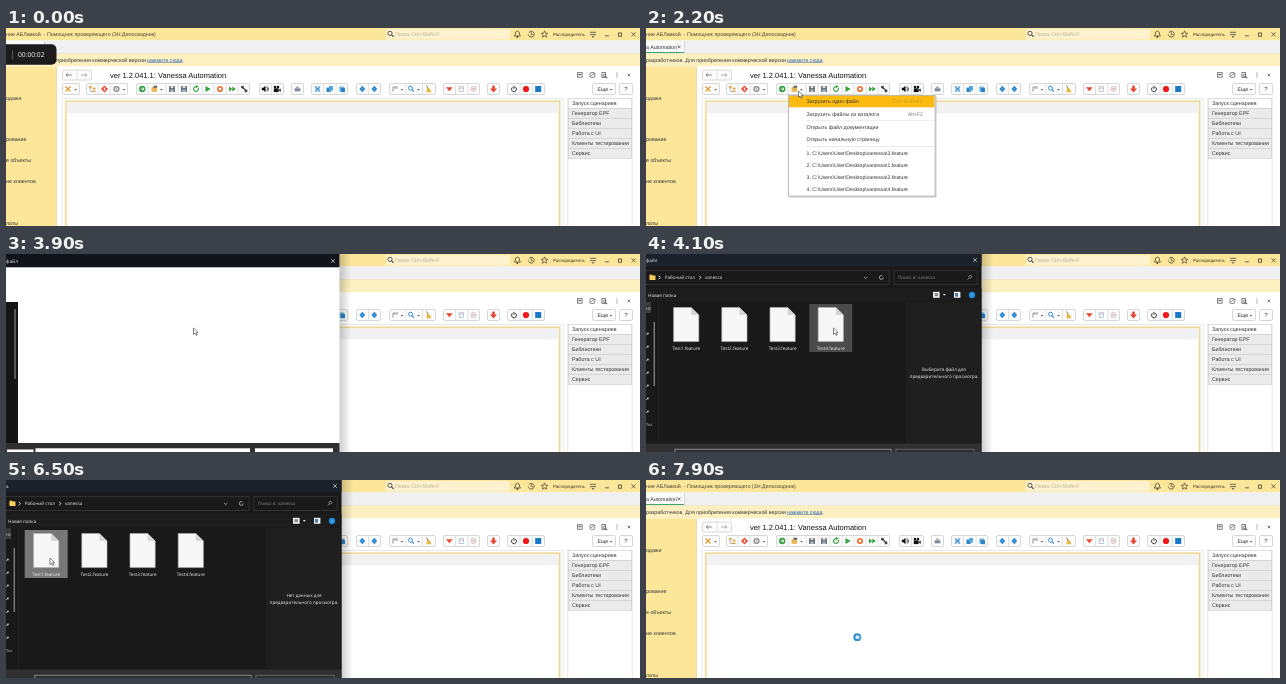
These frames come from a looping animation (634 by 198 pixels, 8000 ms). An HTML page with a canvas:

```html
<!DOCTYPE html>
<html lang="ru">
<head>
<meta charset="utf-8">
<title>Загрузка файла</title>
<style>
html, body { margin: 0; width: 100%; height: 100%; overflow: hidden; background: #fff; }
canvas { display: block; width: 634px; height: 198px; }
</style>
</head>
<body>
<canvas id="stage"></canvas>
<script>
const W = 634, H = 198, LOOP = 8000;
const SANS = '"Liberation Sans", Arial, sans-serif';
const UI = '"Open Sans", "Noto Sans", sans-serif';
const canvas = document.getElementById('stage');
const dpr = window.devicePixelRatio || 1;
canvas.width = W * dpr;
canvas.height = H * dpr;
const c = canvas.getContext('2d');

function rect(x, y, w, h, color) {
  c.fillStyle = color;
  c.fillRect(x, y, w, h);
}

function frame(x, y, w, h, color, lw = 1) {
  c.strokeStyle = color;
  c.lineWidth = lw;
  c.strokeRect(x + lw / 2, y + lw / 2, w - lw, h - lw);
}

function round(x, y, w, h, r, fill, stroke) {
  c.beginPath();
  c.roundRect(x, y, w, h, r);
  if (fill) { c.fillStyle = fill; c.fill(); }
  if (stroke) { c.strokeStyle = stroke; c.lineWidth = 0.8; c.stroke(); }
}

function dot(x, y, r, color) {
  c.beginPath();
  c.arc(x, y, r, 0, 7);
  c.fillStyle = color;
  c.fill();
}

function ring(x, y, r, color, lw = 0.9, from = 0, to = 7) {
  c.beginPath();
  c.arc(x, y, r, from, to);
  c.strokeStyle = color;
  c.lineWidth = lw;
  c.stroke();
}

function trace(pts) {
  c.beginPath();
  for (let i = 0; i < pts.length; i += 2) c.lineTo(pts[i], pts[i + 1]);
}

function poly(color, ...pts) {
  trace(pts);
  c.closePath();
  c.fillStyle = color;
  c.fill();
}

function line(color, lw, ...pts) {
  trace(pts);
  c.strokeStyle = color;
  c.lineWidth = lw;
  c.stroke();
}

function text(s, x, y, size = 5.3, color = '#333', align = 'left', family = SANS) {
  c.font = size + 'px ' + family;
  c.textAlign = align;
  c.textBaseline = 'alphabetic';
  c.fillStyle = color;
  c.fillText(s, x, y + size * 0.35);
  return c.measureText(s).width;
}

const drop = (x, y = 61.7) => poly('#555', x - 1.3, y - 0.6, x + 1.3, y - 0.6, x, y + 0.9);

function cross(x, y, r, color, lw = 0.8) {
  line(color, lw, x - r, y - r, x + r, y + r);
  line(color, lw, x + r, y - r, x - r, y + r);
}

function lens(x, y, color, r = 1.9) {
  ring(x - 0.5, y - 0.5, r, color);
  line(color, 1.1, x + r * 0.5, y + r * 0.5, x + r + 1, y + r + 1);
}

// Toolbar group with cell dividers
function group(x, right, seps = [], y = 55.5, h = 11) {
  round(x + 0.5, y, right - x - 1, h, 1.5, '#fcfcfc', '#cfcfcf');
  for (const s of seps) rect(s - 0.3, y, 0.7, h, '#d8d8d8');
}

function titleBar() {
  rect(0, 0, W, 12.4, '#fbe69a');
  text('ние АБЛавкой  - Помощник проверяющего (3Н:Делосводник)', 0, 6, 5.3, '#4a4433');
  round(380, 1, 124, 10.5, 1, '#fdf2cd');
  lens(384.5, 5.8, '#444', 2.1);
  text('Поиск Ctrl+Shift+F', 389, 6, 5.3, '#b5ae97');
  const k = '#4a4433';
  line(k, 0.8, 508.3, 8, 509.2, 6.8, 509.6, 4.2, 511.4, 3, 513.2, 4.2, 513.6, 6.8, 514.5, 8, 508.3, 8);
  dot(511.4, 9, 0.9, k);
  ring(525.3, 6.2, 2.9, k, 0.8, -2.6, 3);
  line(k, 0.8, 525.3, 4.3, 525.3, 6.4, 526.9, 7);
  const star = [];
  for (let i = 0; i <= 10; i++) {
    const a = i * Math.PI / 5 - Math.PI / 2, r = i % 2 ? 1.5 : 3.5;
    star.push(538.5 + r * Math.cos(a), 6.4 + r * Math.sin(a));
  }
  line(k, 0.7, ...star);
  text('Распорядитель', 547, 6, 4.5, '#3a3424');
  line(k, 0.8, 584, 4.3, 590, 4.3);
  line(k, 0.8, 584, 6.6, 590, 6.6);
  poly(k, 585.5, 8.2, 588.5, 8.2, 587, 9.7);
  line(k, 0.8, 599, 7.8, 603, 7.8);
  frame(612, 4.6, 4, 4, k, 0.8);
  cross(627.5, 6.3, 2, k);
}

function sidebar() {
  rect(0, 38.5, 50.5, 160, '#fbe69a');
  rect(50, 38.5, 0.8, 160, '#e3d7a6');
  text('одажи', 0, 70);
  text('рование', 0, 111.5);
  text('е объекты', 0, 132.5);
  text('ие клиентов', 0, 153.5);
  text('латы', 0, 195);
}

function tabsAndBanner() {
  rect(0, 12.4, W, 13, '#f0f0f0');
  rect(0, 13, 38, 12, '#fafafa');
  rect(0, 24, 38, 1, '#3fa764');
  rect(38, 13, 0.7, 12, '#ccc');
  text('a Automation', 0, 19);
  cross(33, 18.8, 1.5, '#555');
  rect(0, 25.4, W, 13.1, '#fdf0c0');
  rect(0, 25.2, W, 0.6, '#e6dfc6');
  text('разработчиков. Для приобретения коммерческой версии ', 0, 32);
  const w = text('нажмите сюда', 141, 32, 5.3, '#2a66b5');
  rect(141, 34.5, w, 0.5, '#2a66b5');
  text('.', 141 + w, 32);
}

function floppy(x) {
  rect(x - 2.8, 58.2, 5.6, 5.8, '#4b5159');
  rect(x - 1.5, 58.2, 3, 2.1, '#dfe3e8');
  rect(x - 1.8, 61.4, 3.6, 2.6, '#aeb6c0');
}

function arrowIcon(x, y, d, color) {
  line(color, 0.8, x - 2.8, y, x + 2.8, y);
  line(color, 0.8, x + d, y - 1.7, x + d * 2.8, y, x + d, y + 1.7);
}

function toolbar() {
  const y = 61, blue = '#2684d0', red = '#e8452f', dark = '#444', green = '#33a13f', soft = '#606060';
  group(56, 86, [71], 42, 10);
  arrowIcon(63, 47, -1, '#666');
  arrowIcon(78, 47, 1, '#999');

  group(56, 74);
  cross(62, y, 2.5, '#e39a2e', 1.3);
  drop(69.5);

  group(80, 122, [92, 104]);
  rect(83, 58, 2.5, 2, '#e6a23a');
  line('#888', 0.6, 84.2, 60, 84.2, 63.5, 87, 63.5);
  rect(86.5, 59.7, 3, 1.6, '#dca24a');
  rect(86.5, 62.5, 3, 1.6, '#dca24a');
  poly(red, 98.5, 57.5, 102, 61, 98.5, 64.5, 95, 61);
  rect(97.8, 59.6, 1.4, 2.8, '#fff');
  ring(110.5, y, 2.4, '#858585', 1.3);
  dot(110.5, y, 0.8, '#858585');
  drop(118);

  group(130, 244, [142, 160, 172, 184, 196, 208, 220, 232]);
  dot(136.2, y, 3.2, green);
  line('#fff', 0.9, 134.5, y, 138, y);
  line('#fff', 0.9, 136.5, 59.4, 138, y, 136.5, 62.6);
  rect(145.5, 59, 5.5, 4.8, '#e8b64d');
  rect(147.5, 57.7, 3.7, 2, '#5c6670');
  drop(155.5);
  floppy(166);
  floppy(178);
  ring(190, y, 2.4, green, 1.1, -0.5, 4.8);
  poly(green, 190, 57, 192.8, 58.5, 190, 60);
  poly(green, 199.5, 58, 204.7, 61, 199.5, 64);
  dot(214, y, 3.1, '#f07840');
  rect(212.9, 59.9, 2.2, 2.2, '#fff');
  poly(green, 223, 58.5, 226.3, 61, 223, 63.5);
  poly(green, 226.3, 58.5, 229.8, 61, 226.3, 63.5);
  line(dark, 1.2, 235.5, 58.5, 241, 63.5);
  dot(236.5, 59.2, 1.4, dark);
  dot(240, 63, 1.4, dark);

  group(253, 278, [265.5]);
  poly('#111', 255.8, 59.8, 257.3, 59.8, 259.5, 57.8, 259.5, 64.2, 257.3, 62.2, 255.8, 62.2);
  ring(259.5, y, 1.8, '#111', 0.7, -1, 1);
  ring(259.5, y, 3, '#111', 0.7, -1, 1);
  rect(267.8, 60.3, 4.8, 3.8, '#111');
  dot(269, 59, 1.3, '#111');
  dot(272, 59, 1.3, '#111');
  poly('#111', 272.6, 62, 274.7, 60.5, 274.7, 64);

  group(285, 298);
  rect(288.6, 60.3, 5.8, 3, '#8088a0');
  rect(290, 58.5, 3, 2, '#b2a8ba');

  group(305, 342, [317.5, 330]);
  cross(311.5, y, 2.6, blue, 1.1);
  frame(309, 58.5, 5, 5, '#8ab9df', 0.7);
  rect(320.5, 59.6, 4.2, 4.4, blue);
  rect(323, 58, 4, 4.6, '#55a5df');
  rect(333.3, 58.5, 5, 5.2, '#77afd8');
  rect(335, 60, 4, 4.2, blue);

  group(350, 375, [362.5]);
  for (const x of [356.3, 368.3]) {
    poly(blue, x, 57.8, x + 2.9, 61, x, 64.2, x - 2.9, 61);
    rect(x - 0.6, 59.7, 1.2, 2.6, '#5aa9e0');
  }

  group(383, 430, [400, 416.5]);
  line('#777', 0.8, 387, 63.5, 387, 59, 392, 59);
  rect(388.2, 59.8, 3.5, 0.8, '#aaa');
  drop(396);
  lens(405, 60.7, blue, 2);
  drop(412.5);
  line('#9a7435', 1, 420.5, 57.5, 422.5, 61);
  poly('#e3b83e', 421, 60, 424, 61, 425.5, 64.3, 420.5, 64.3);

  group(437, 474, [449.5, 462]);
  poly(red, 440, 59.3, 446.6, 59.3, 443.3, 63.3);
  frame(452.8, 58.3, 5, 5.5, '#b8bdc8', 0.8);
  rect(452.8, 59.8, 5, 0.8, '#b8bdc8');
  ring(467.5, y, 2.6, '#cdb0b0', 0.8);
  cross(467.5, y, 1.2, '#cf9090');

  group(481, 494);
  poly(red, 484, 60.5, 491, 60.5, 487.5, 64.5);
  rect(486.2, 57.6, 2.6, 3.5, red);

  group(501, 539, [514, 526.5]);
  ring(508, 61.2, 2.5, '#333', 1, -1, 4.1);
  line('#333', 1, 508, 57.8, 508, 60.8);
  dot(520, y, 3.1, '#f01818');
  rect(529.2, 58, 6, 6, '#1878c8');

  group(586, 610);
  text('Еще', 591.5, 61.2);
  drop(605);
  group(613, 627);
  text('?', 620, 61.2, 6, '#333', 'center');

  frame(571, 44.3, 5.5, 5.3, soft, 0.8);
  rect(572.4, 46, 2.7, 1.2, soft);
  round(584, 44.6, 4.8, 4.8, 1.2, null, soft);
  line(soft, 0.8, 585.2, 48, 588.2, 45);
  frame(595.5, 44.2, 4.5, 5.5, soft, 0.8);
  lens(599, 48, soft, 1.2);
  for (const d of [-2, 0, 2]) dot(611, 47 + d, 0.6, soft);
  cross(623, 47, 1.3, soft);
}

const SECTIONS = ['Запуск сценариев', 'Генератор EPF', 'Библиотеки', 'Работа с UI', 'Клиенты тестирования', 'Сервис'];

function workspace() {
  rect(50, 38.5, W - 50, 160, '#fff');
  text('ver 1.2.041.1: Vanessa Automation', 104, 47, 7.5, '#111');
  toolbar();
  frame(55.5, 70, 502, 140, '#dedede', 0.7);
  frame(58.6, 72, 496.3, 140, '#f6edcc', 2.6);
  frame(59.4, 72.8, 494.7, 140, '#e8d897', 1);
  rect(61, 75, 492, 10.2, '#f1f1f1');
  frame(561.5, 70, 65, 140, '#dadada', 0.7);
  SECTIONS.forEach((s, i) => {
    const y = 70.2 + i * 10.03;
    rect(562, y, 64, 10, i ? '#ebebeb' : '#fff');
    frame(562, y, 64, 10.3, '#cbcbcb', 0.6);
    text(s, 566, y + 5.1, 5.35);
  });
}

function badge(t) {
  const alpha = 1 - Math.min(1, Math.max(0, (t - 600) / 300));
  if (!alpha) return;
  c.save();
  c.globalAlpha = alpha;
  round(-10, 16.3, 60.5, 20.5, 5, '#1c1c1c');
  rect(6, 22.5, 0.7, 9, '#777');
  text('00:00:02', 12, 26.8, 6.7, '#fff', 'left', UI);
  c.restore();
}

const MENU = [
  [73.5, 'Загрузить один файл', 'Ctrl+Shift+F2'],
  [86, 'Загрузить файлы из каталога', 'Alt+F2'],
  [99.3, 'Открыть файл документации'],
  [111.5, 'Открыть начальную страницу']
];

function menu() {
  rect(143.5, 68.5, 147, 101, 'rgba(0,0,0,.22)');
  rect(142, 67, 147.5, 101.5, '#fff');
  frame(142, 67, 147.5, 101.5, '#a8a8a8', 0.8);
  rect(143, 67.8, 145.5, 11.5, '#fdbb12');
  for (const [y, label, key] of MENU) {
    text(label, 160.5, y);
    if (key) text(key, 277, y, 5.2, y < 80 ? '#c99a2c' : '#777', 'right');
  }
  for (const y of [92.5, 118.3]) rect(160, y, 128, 0.6, '#ddd');
  [3, 1, 2, 4].forEach((n, i) =>
    text(`${i + 1}. C:\\Users\\User\\Desktop\\vanessa\\${n}.feature`, 160.5, 125 + i * 12.2, 5.2));
}

function shadow(x) {
  const g = c.createLinearGradient(x, 0, x + 12, 0);
  g.addColorStop(0, 'rgba(0,0,0,.2)');
  g.addColorStop(1, 'rgba(0,0,0,0)');
  rect(x, 0, 12, H, g);
}

function dialogOpening() {
  shadow(333);
  rect(0, 0, 333.5, H, '#fff');
  rect(0, 0, 333.5, 13.3, '#11151b');
  text('файл', 0, 7, 4.8, '#eee', 'left', UI);
  cross(327, 7, 1.8, '#ddd', 0.7);
  rect(0, 48, 12, 142, '#141414');
  rect(8.5, 55, 1, 70, '#999');
  rect(0, 189, 333.5, 9, '#2f2f2f');
  rect(1, 195.5, 26.5, 3, '#fff');
  rect(29.5, 194.3, 214.5, 4, '#fff');
  rect(249, 194.3, 78, 4, '#fff');
}

function fileIcon(i, state) {
  const x = 40.2 + i * 48.2;
  if (state) rect(x - 21.5, 50, 43, 48, state === 2 ? '#777' : '#4b4b4b');
  const page = [x - 12.6, 53.5, x + 5, 53.5, x + 12.6, 61, x + 12.6, 87.6, x - 12.6, 87.6];
  poly('#f7f7f7', ...page);
  c.closePath();
  c.strokeStyle = '#b5b5b5';
  c.lineWidth = 0.6;
  c.stroke();
  poly('#d6d6d6', x + 5, 53.5, x + 12.6, 61, x + 5, 61);
  text(`Test${i + 1}.feature`, x, 94, 4.6, '#f4f4f4', 'center', UI);
}

function dialog(t) {
  const picked = t >= 6000;
  const say = (s, x, y, color = '#f0f0f0', align) => text(s, x, y, 4.6, color, align, UI);
  shadow(335);
  rect(0, 0, 335.5, H, '#191919');
  rect(0, 0, 335.5, 12.6, '#1b222c');
  say(picked ? 'а' : 'файл', 0, 6.7);
  cross(329, 6, 1.8, '#ddd', 0.7);

  frame(-2, 16.3, 245.5, 14.5, '#383838', 0.8);
  frame(247.5, 16.3, 84, 14.5, '#383838', 0.8);
  rect(3.5, 20.6, 3, 2, '#e0a72e');
  rect(3.5, 21.5, 6, 4.5, '#f7cf5c');
  for (const x of [13.5, 54]) line('#eee', 0.9, x - 0.8, 21.8, x + 0.9, 23.5, x - 0.8, 25.2);
  say('Рабочий стол', 18.7, 23.3);
  say('vanessa', 59, 23.3);
  line('#ccc', 0.7, 218, 23, 219.7, 24.6, 221.4, 23);
  ring(235.3, 23.5, 1.9, '#ddd', 0.7, 0, 5.3);
  say('Поиск в: vanessa', 252, 23.3, '#8c8c8c');
  ring(324.3, 22.7, 1.4, '#bbb', 0.6);
  line('#bbb', 0.6, 323.3, 23.7, 321.6, 25.5);

  rect(0, 34, 335.5, 13.5, '#1d1d1d');
  say('Новая папка', 2, 41);
  rect(287, 37.8, 6.6, 6, '#eee');
  rect(288.6, 39.2, 3.4, 3, '#8a8a8a');
  poly('#ddd', 296.8, 40, 299.8, 40, 298.3, 41.7);
  rect(308, 37.8, 6.4, 6, '#eee');
  rect(309, 39, 3, 3.6, '#4f7fa8');
  dot(326, 41, 3.2, '#198ad8');
  text('?', 326, 41, 4.5, '#fff', 'center', UI);

  rect(0, 48, 5, 11, '#3a3a3a');
  say('нс', 0, 54, '#ccc');
  for (let y = 80; y < 160; y += 13) {
    line('#bbb', 0.9, 0, y + 1.3, 2.5, y - 1.2);
    dot(1.8, y - 0.5, 0.9, '#bbb');
  }
  say('ты', 0, 170, '#ccc');
  rect(7.7, 68, 1.1, 64, '#999');
  rect(12, 48, 0.6, 141, '#262626');
  rect(260, 48, 75.5, 141, '#1f1f1f');

  if (t >= 4100) {
    const x = cursorAt(t - 100)[0];
    const hover = Math.floor((x - 16) / 48.2);
    for (let i = 0; i < 4; i++) fileIcon(i, picked && i === 0 ? 2 : hover === i ? 1 : 0);
  }
  say(picked ? 'Нет данных для' : 'Выберите файл для', 298, 115, '#f0f0f0', 'center');
  say('предварительного просмотра.', 298, 122, '#f0f0f0', 'center');

  rect(0, 189.5, 335.5, 9, '#303030');
  frame(28.5, 194.8, 217, 10, '#9a9a9a', 0.8);
  frame(249.5, 194.8, 79, 10, '#707070', 0.8);
}

// Pointer keyframes: time, x, y
const PATH = [
  [400, -8, 60], [1300, 152.5, 63], [2300, 152.5, 63], [3000, 187.5, 74],
  [4700, 187.5, 74], [5000, 114, 83], [5500, 44, 78], [6900, 44, 78],
  [7700, 211, 157], [8000, 211, 157]
];

function cursorAt(t) {
  const i = PATH.findIndex(p => p[0] > t);
  if (i <= 0) return i ? PATH.at(-1).slice(1) : PATH[0].slice(1);
  const [t0, x0, y0] = PATH[i - 1], [t1, x1, y1] = PATH[i];
  const k = (t - t0) / (t1 - t0);
  return [x0 + (x1 - x0) * k, y0 + (y1 - y0) * k];
}

function pointer(t) {
  const [x, y] = cursorAt(t);
  if (t >= 6600) {
    dot(x + 0.3, y + 0.2, 3.9, '#2f8dcc');
    dot(x + 0.3, y + 0.2, 1.9, '#d9effb');
    const a = t / 1000 * 2 * Math.PI;
    ring(x + 0.3, y + 0.2, 2.9, '#78c3ec', 1, a, a + 1.7);
    return;
  }
  poly('#fff', x, y, x, y + 6.4, x + 1.5, y + 5.1, x + 2.6, y + 7.4,
    x + 3.7, y + 6.9, x + 2.7, y + 4.7, x + 4.7, y + 4.6);
  c.strokeStyle = '#333';
  c.lineWidth = 0.6;
  c.stroke();
}

function draw(t) {
  c.setTransform(dpr, 0, 0, dpr, 0, 0);
  c.textRendering = 'geometricPrecision';
  rect(0, 0, W, H, '#fff');
  titleBar();
  tabsAndBanner();
  workspace();
  sidebar();
  badge(t);
  if (t >= 1500 && t < 3300) menu();
  if (t >= 3800 && t < 4000) dialogOpening();
  else if (t >= 4000 && t < 6600) dialog(t);
  pointer(t);
}

function tick(now) {
  draw(now % LOOP);
  requestAnimationFrame(tick);
}
draw(0);
requestAnimationFrame(tick);
</script>
</body>
</html>
```
